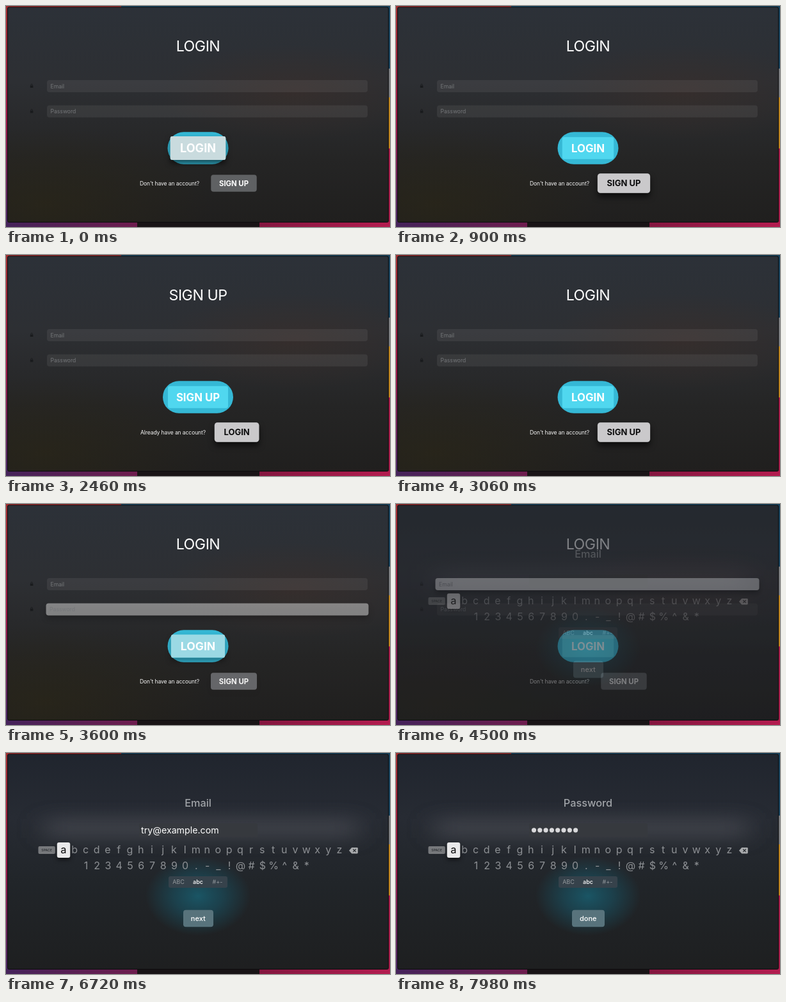
These frames come from a looping animation (600 by 346 pixels, 8 s). An HTML page:

```html
<!DOCTYPE html>
<html lang="en">
<head>
<meta charset="utf-8">
<title>Login</title>
<style>
@property --f { syntax: "<number>"; inherits: true; initial-value: 0; }
html, body { margin: 0; width: 100%; height: 100%; overflow: hidden; background: #1c1a1c; }
svg { display: block; width: 100vw; height: 100vh; font-family: Inter, "Open Sans", sans-serif; }
text { white-space: pre; }
.mid { text-anchor: middle; }

/* Screens */
#form, #keyboard, .login, .signup, .email, .password { animation: 8s linear infinite; }
#form { animation-name: form; }
#keyboard { animation-name: keyboard; }
.login { animation-name: login; }
.signup { animation-name: signup; }
.email { animation-name: email; }
.password { animation-name: password; }
@keyframes form { 0%, 54.5% { opacity: 1 } 59.5%, 100% { opacity: 0 } }
@keyframes keyboard { 0%, 54.5% { opacity: 0 } 59.5%, 100% { opacity: 1 } }
@keyframes login { 0%, 14% { opacity: 1 } 15.5%, 35% { opacity: 0 } 36.5%, 100% { opacity: 1 } }
@keyframes signup { 0%, 14% { opacity: 0 } 15.5%, 35% { opacity: 1 } 36.5%, 100% { opacity: 0 } }
@keyframes email { 0%, 85.2% { opacity: 1 } 88%, 100% { opacity: 0 } }
@keyframes password { 0%, 87% { opacity: 0 } 90%, 100% { opacity: 1 } }

/* Focus: --f runs from 0 (idle) to 1 (focused) */
.focus {
  transform-box: fill-box; transform-origin: center;
  transform: scale(calc(1 + var(--grow) * var(--f)));
  filter: drop-shadow(0 5px 4px rgb(0 0 0 / calc(var(--f) * .6)));
  animation: 8s ease-out infinite;
}
.glow { opacity: var(--f); }
.small text { fill: color-mix(in srgb, #0b0b0c calc(var(--f) * 100%), #fff); }
.big-login { animation-name: big-login; }
.small-signup { animation-name: small-signup; }
.big-signup { animation-name: big-signup; }
.small-login { animation-name: small-login; }
.field-password { animation-name: field-password; }
.field-email { animation-name: field-email; }
@keyframes big-login { 0%, 5% { --f: 1 } 8.5%, 40.2% { --f: 0 } 42.5%, 44% { --f: 1 } 48%, 99.9% { --f: 0 } 100% { --f: 1 } }
@keyframes small-signup { 0%, 5% { --f: 0 } 8%, 15.5% { --f: 1 } 15.6%, 35% { --f: 0 } 35.1%, 40.5% { --f: 1 } 46%, 100% { --f: 0 } }
@keyframes big-signup { 0%, 21.3% { --f: 0 } 24%, 27% { --f: 1 } 30.8%, 100% { --f: 0 } }
@keyframes small-login { 0%, 14% { --f: 0 } 14.1% { --f: 1 } 18%, 27.2% { --f: 0 } 30%, 36.5% { --f: 1 } 36.6%, 100% { --f: 0 } }
@keyframes field-password { 0%, 44% { --f: 0 } 46.5%, 47.8% { --f: 1 } 50.5%, 100% { --f: 0 } }
@keyframes field-email { 0%, 47.8% { --f: 0 } 50.3%, 99.9% { --f: 1 } 100% { --f: 0 } }

/* Typing */
.typed {
  fill-opacity: 0;
  animation: typed 8s step-end infinite;
  animation-delay: calc(var(--start) + var(--i) * var(--pace));
}
@keyframes typed { 0% { fill-opacity: 1 } 30%, 100% { fill-opacity: 0 } }
</style>
</head>
<body>
<svg viewBox="0 0 600 346" preserveAspectRatio="none">
  <defs>
    <linearGradient id="left" x2="0" y2="1">
      <stop stop-color="#a33032"/><stop offset=".5" stop-color="#a01848"/><stop offset="1" stop-color="#4a2a68"/>
    </linearGradient>
    <linearGradient id="bottom">
      <stop stop-color="#45235a"/><stop offset=".34" stop-color="#6e1d4e"/><stop offset=".66" stop-color="#84163f"/><stop offset="1" stop-color="#b41d50"/>
    </linearGradient>
    <linearGradient id="formBase" x2="0" y2="1">
      <stop stop-color="#2c3138"/><stop offset=".35" stop-color="#2d2f33"/><stop offset=".7" stop-color="#252525"/><stop offset="1" stop-color="#201f1e"/>
    </linearGradient>
    <linearGradient id="keyBase" x2="0" y2="1">
      <stop stop-color="#20252e"/><stop offset=".3" stop-color="#272b33"/><stop offset=".6" stop-color="#212529"/><stop offset="1" stop-color="#1e1f20"/>
    </linearGradient>
    <radialGradient id="brown"><stop stop-color="#3a2e2a" stop-opacity=".65"/><stop offset="1" stop-color="#3a2e2a" stop-opacity="0"/></radialGradient>
    <radialGradient id="olive"><stop stop-color="#2a2618" stop-opacity=".7"/><stop offset="1" stop-color="#2a2618" stop-opacity="0"/></radialGradient>
    <radialGradient id="teal"><stop stop-color="#1a5868" stop-opacity=".95"/><stop offset=".45" stop-color="#1a4d5c" stop-opacity=".7"/><stop offset="1" stop-color="#1a4d5c" stop-opacity="0"/></radialGradient>
    <filter id="soft" x="-20%" y="-100%" width="140%" height="300%"><feGaussianBlur stdDeviation="20 14"/></filter>
    <clipPath id="window"><rect x="3" y="2.5" width="594" height="335.5" rx="2"/></clipPath>
  </defs>

  <!-- Desktop edges -->
  <rect width="600" height="346" fill="#17415a"/>
  <rect width="180" height="3" fill="#8d2b2c"/>
  <rect width="4" height="346" fill="url(#left)"/>
  <rect x="596" y="98" width="4" height="45" fill="#77797c"/>
  <rect x="596" y="143" width="4" height="80" fill="#bd841f"/>
  <rect x="596" y="223" width="4" height="123" fill="#a31c48"/>
  <rect y="338" width="600" height="8" fill="url(#bottom)"/>
  <rect x="205" y="339" width="191" height="7" fill="#191416"/>
  <rect x="2" y="1.5" width="596" height="337.5" rx="3" fill="#0c0c0e"/>

  <g clip-path="url(#window)">
    <rect width="600" height="340" fill="#222428"/>
    <g id="form">
      <rect width="600" height="340" fill="url(#formBase)"/>
      <ellipse cx="450" cy="135" rx="210" ry="75" fill="url(#brown)"/>
      <ellipse cx="60" cy="310" rx="260" ry="120" fill="url(#olive)"/>
    </g>
    <g id="keyboard">
      <rect width="600" height="340" fill="url(#keyBase)"/>
      <rect x="60" y="103" width="490" height="30" fill="#4b4e55" opacity=".7" filter="url(#soft)"/>
      <ellipse cx="300" cy="224" rx="82" ry="62" fill="url(#teal)"/>
    </g>
  </g>
</svg>

<script>
const form = document.getElementById('form');
const keyboard = document.getElementById('keyboard');
const add = (parent, markup) => parent.insertAdjacentHTML('beforeend', markup);

const box = (cx, cy, w, h, r, fill, extra = '') =>
  `<rect x="${cx - w / 2}" y="${cy - h / 2}" width="${w}" height="${h}" rx="${r}" fill="${fill}" ${extra}/>`;

const label = (x, y, size, fill, text, extra = 'class="mid"') =>
  `<text x="${x}" y="${y}" font-size="${size}" fill="${fill}" ${extra}>${text}</text>`;

function field(name, cy) {
  const lock = `<rect x="37.8" y="${cy - 1}" width="4.6" height="3.6" rx=".6" fill="#191b1d"/>
    <path d="M38.8 ${cy - 1}v-1a1.3 1.3 0 0 1 2.6 0v1" fill="none" stroke="#191b1d" stroke-width=".8"/>`;
  return `${lock}<g class="focus field-${name.toLowerCase()}" style="--grow:.01">
    ${box(314.5, cy, 501, 19, 4, '#fff', 'fill-opacity=".065"')}
    ${box(314.5, cy, 501, 19, 4, '#bdbdbe', 'class="glow"')}
    ${label(69.5, cy + 3.1, 8.6, '#75777a', name, '')}</g>`;
}

// One variant of the form: title, main button, prompt and switch button.
function variant(mode, title, pill, inner, prompt, other, cx, width) {
  const otherMode = mode === 'login' ? 'signup' : 'login';
  return `<g class="${mode}">
    ${label(300, 70.6, 23.2, '#fff', title, 'class="mid" letter-spacing="-.5"')}
    ${box(300, 222.5, pill, 50.5, 25.25, '#35b8d5')}
    <g class="focus big-${mode}" style="--grow:.075">
      ${box(300, 222.5, inner, 34.5, 3, '#50d7ef')}
      ${box(300, 222.5, inner, 34.5, 3, '#c9dbde', 'class="glow"')}
      ${label(300, 228.7, 16.8, '#fff', title, 'class="mid" font-weight="700"')}
    </g>
    ${label(mode === 'login' ? 209 : 210, 280.8, 8.6, '#f4f4f4', prompt, 'letter-spacing="-.12"')}
    <g class="focus small small-${otherMode}" style="--grow:.15">
      ${box(cx, 277.5, width, 26.5, 4, '#5f6163')}
      ${box(cx, 277.5, width, 26.5, 4, '#cac9cb', 'class="glow"')}
      ${label(cx, 281.6, 11.3, '#fff', other, 'class="mid" font-weight="700"')}
    </g>
  </g>`;
}

add(form, field('Email', 125.5) + field('Password', 165));
add(form, variant('login', 'LOGIN', 95, 80.5, "Don't have an account?", 'SIGN UP', 356, 71.5));
add(form, variant('signup', 'SIGN UP', 110, 94, 'Already have an account?', 'LOGIN', 360.6, 60.5));

// Keyboard
const pitch = 17.24;
const row = (chars, x, y) => [...chars]
  .map((c, i) => label(x + i * pitch, y, 16, '#8d9094', c === '&' ? '&amp;' : c)).join('');

add(keyboard, `
  ${box(300.5, 121, 185, 21.5, 2, '#36393e')}
  ${box(63.7, 152, 26.5, 12, 2, '#77797c')}
  ${label(63.7, 154, 5.2, '#24272b', 'SPACE', 'class="mid" font-weight="500"')}
  ${row('bcdefghijklmnopqrstuvwxyz', 90 + pitch, 157)}
  ${row('1234567890.-_!@#$%^&*', 125, 181.5)}
  <g style="filter:drop-shadow(0 3px 3px #0009)">${box(90, 152, 20.5, 24, 3, '#e9e9ea')}</g>
  ${label(90, 157, 16.5, '#0c0c0d', 'a')}
  <path d="M536 152.7l4.2-4.7h8.3q1.3 0 1.3 1.3v6.8q0 1.3-1.3 1.3h-8.3z" fill="#a8aaac"/>
  <path d="M542.3 150.5l4.4 4.4m0-4.4l-4.4 4.4" stroke="#25292d" stroke-width="1.1"/>
  ${box(300, 202, 92, 18, 3, '#36424b')}
  ${label(269.5, 205.2, 9, '#93999d', 'ABC')}
  ${label(300, 205.2, 9, '#fff', 'abc', 'class="mid" font-weight="500"')}
  ${label(330.5, 205.2, 9, '#93999d', '#+-')}`);

const step = (name, title, button, width, content) => `<g class="${name}">
  ${label(300, 83.8, 16.3, '#a1a4a8', title, 'class="mid" font-weight="500"')}
  ${content}
  ${box(300.5, 259, width, 26.5, 4, '#58737c')}
  ${label(300.3, 262.8, 11, '#fff', button, 'class="mid" font-weight="500"')}
</g>`;

const address = [...'try@example.com']
  .map((c, i) => `<tspan class="typed" style="--i:${i}">${c}</tspan>`).join('');
const dots = Array.from({ length: 8 }, (_, i) =>
  `<circle class="typed" style="--i:${i}" cx="${215.5 + i * 9.3}" cy="120.8" r="3.6" fill="#d9d9db"/>`).join('');

add(keyboard, step('email', 'Email', 'next', 47,
  label(211, 126, 14.2, '#fff', address, 'style="--start:5080ms;--pace:92ms"')));
add(keyboard, step('password', 'Password', 'done', 51,
  `<g style="--start:7350ms;--pace:78ms">${dots}</g>`));
</script>
</body>
</html>
```
